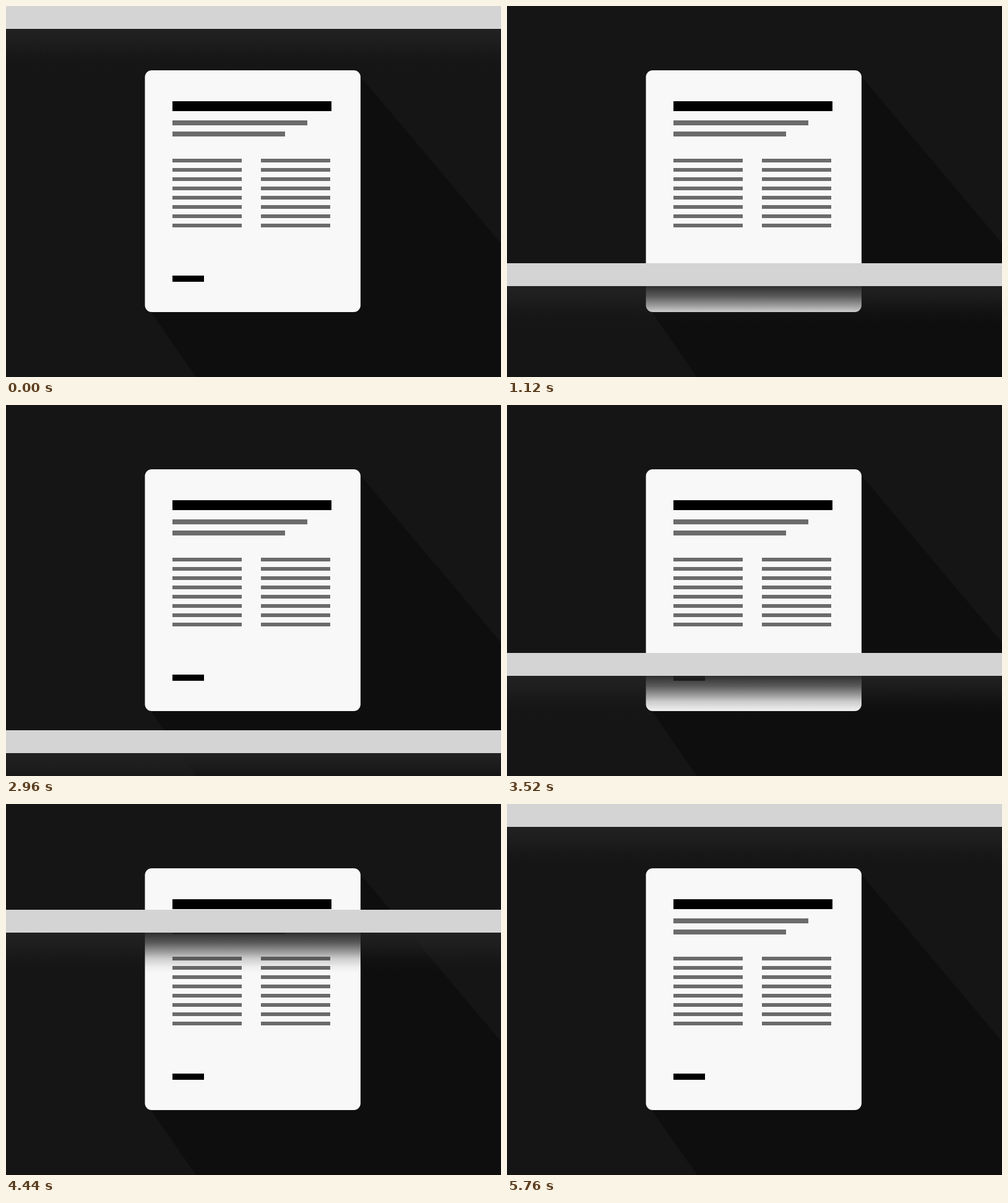
Write an HTML page that moves like this. It is 800 px wide and 600 px high and loops after 5.8 s.

```html
<!DOCTYPE html>
<html lang="en">
<head>
<meta charset="utf-8">
<title>Document scan</title>
<style>
  html, body { margin: 0; width: 100%; height: 100%; overflow: hidden; background: #151515; }
  svg { display: block; width: 800px; height: 600px; }
</style>
</head>
<body>
<svg viewBox="0 0 800 600">
  <defs>
    <linearGradient id="fade" x1="0" y1="0" x2="0" y2="1">
      <stop offset="0" stop-color="#222" stop-opacity=".94"/>
      <stop offset=".25" stop-color="#222" stop-opacity=".74"/>
      <stop offset=".5" stop-color="#222" stop-opacity=".41"/>
      <stop offset=".64" stop-color="#222" stop-opacity=".21"/>
      <stop offset=".85" stop-color="#222" stop-opacity=".05"/>
      <stop offset="1" stop-color="#222" stop-opacity="0"/>
    </linearGradient>
  </defs>
  <rect width="800" height="600" fill="#151515"/>
  <path d="M570 107 L573 114 L800 384 V600 H307 L232 492 Z" fill="#0e0e0e"/>
  <rect x="224.5" y="104" width="348.5" height="391" rx="11" fill="#f8f8f8"/>
  <g id="lines"></g>
  <g id="scanner">
    <rect y="37" width="800" height="65" fill="url(#fade)"/>
    <rect width="800" height="37" fill="#d4d4d4"/>
  </g>
</svg>
<script>
const LOOP = 5800, STEP = 40;
const BLACK = '#000', GREY = '#6b6b6b';
const lines = document.getElementById('lines');
const scanner = document.getElementById('scanner');

function addLine(x, y, width, height, fill) {
  const rect = document.createElementNS('http://www.w3.org/2000/svg', 'rect');
  for (const [name, value] of Object.entries({ x, y, width, height, fill })) {
    rect.setAttribute(name, value);
  }
  lines.append(rect);
}

addLine(269, 154, 257, 16, BLACK);
addLine(269, 185, 218, 8, GREY);
addLine(269, 203, 182, 8, GREY);
for (let row = 0; row < 8; row++) {
  for (const x of [269, 412]) addLine(x, 247 + row * 15, 112, 6, GREY);
}
addLine(269, 436, 51, 10, BLACK);

// time in ms, top of the bar in px, speed in px per ms
const keys = [
  [0, 0, .02], [300, 30, .24], [600, 156, .5], [1200, 456, .5],
  [1350, 513, .22], [1800, 550, .055], [2080, 564, 0], [2400, 556, -.028],
  [2700, 546, -.055], [3000, 520, -.175], [3250, 468.5, -.25],
  [4700, 106, -.25], [4800, 83, -.22], [5100, 32, -.11],
  [5400, 14, -.045], [5760, 0, 0], [LOOP, 0, 0]
];

// cubic Hermite curve through the keys
function barTop(t) {
  const i = keys.findIndex(key => key[0] > t);
  const [t0, y0, v0] = keys[i - 1];
  const [t1, y1, v1] = keys[i];
  const span = t1 - t0, s = (t - t0) / span, r = 1 - s;
  return y0 * r * r * (1 + 2 * s) + y1 * s * s * (3 - 2 * s)
    + span * s * r * (v0 * r - v1 * s);
}

const start = performance.now();

function draw(now) {
  const t = Math.max(0, now - start) % LOOP;
  const y = Math.round(barTop(Math.floor(t / STEP) * STEP));
  scanner.setAttribute('transform', `translate(0 ${y})`);
  requestAnimationFrame(draw);
}

draw(start);
</script>
</body>
</html>
```
